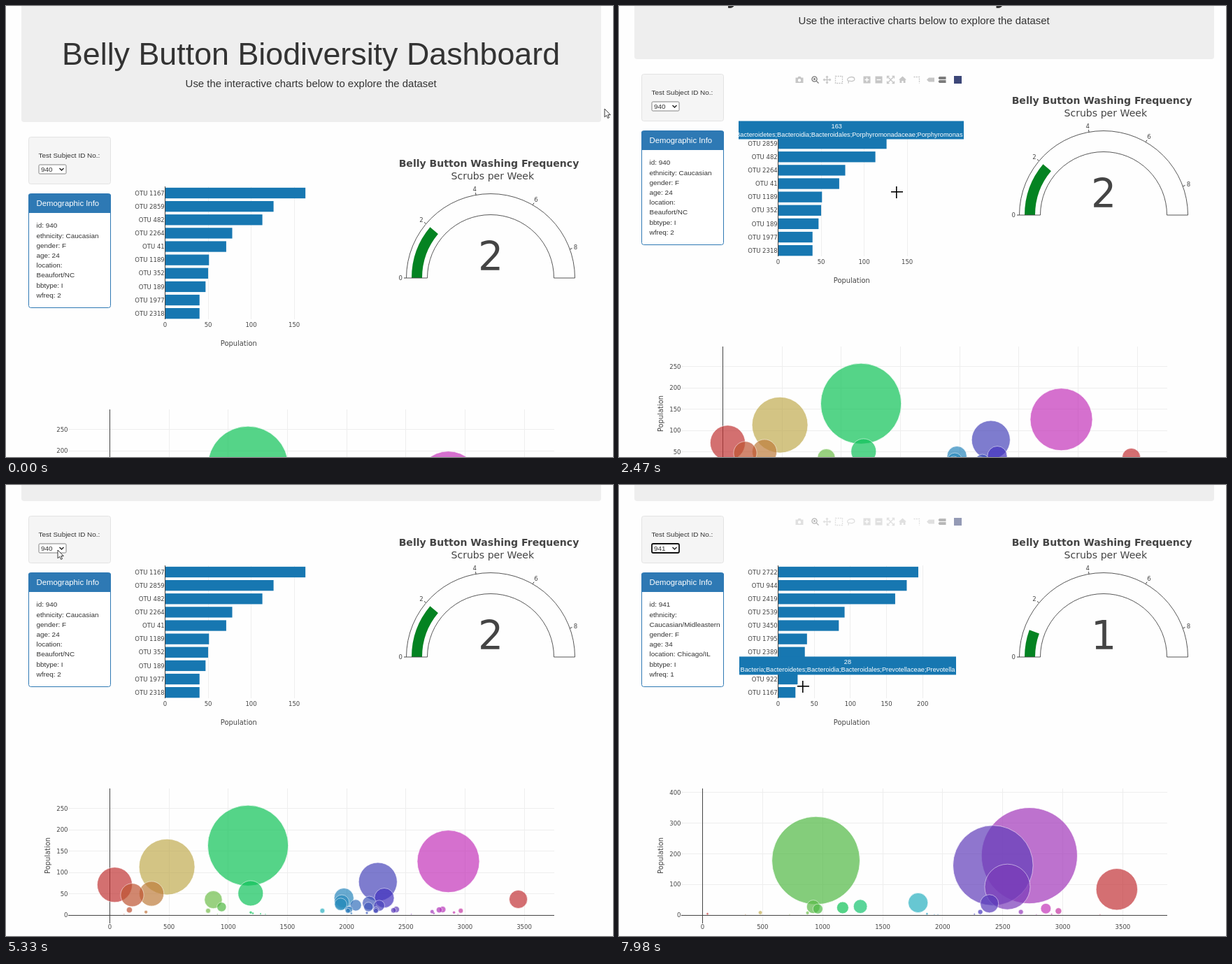
These frames come from a looping animation (868 by 645 pixels, 8 s). An HTML page:

```html
<!DOCTYPE html>
<html lang="en">
<head>
<meta charset="utf-8">
<title>Biodiversity Dashboard</title>
<style>
  html, body { margin: 0; width: 100%; height: 100%; overflow: hidden; background: #fefefe; }
  #stage { position: relative; width: 868px; height: 645px; overflow: hidden; background: #fefefe; isolation: isolate; }
  #stage > * { position: absolute; left: 0; top: 0; }
  text { font-family: "DejaVu Sans", Verdana, sans-serif; fill: #444; white-space: pre; }
  .ui { font-family: "Liberation Sans", Arial, sans-serif; fill: #333; }
  .white { fill: #fff; }
  .bold { font-weight: bold; }

  #page { animation: scroll 8s step-end infinite; }
  .first { animation: first 8s step-end infinite; }
  .second { animation: second 8s step-end infinite; }
  .tipA { animation: tipA 8s step-end infinite; }
  .tipB { animation: tipB 8s step-end infinite; }
  .list { animation: list 8s step-end infinite; }
  .pick { animation: pick 8s step-end infinite; }
  .barTools { animation: barTools 8s ease infinite; }
  .dialTools { animation: dialTools 8s ease infinite; }
  #arrow { animation: move 8s linear infinite, arrow 8s step-end infinite; }
  #cross { width: 17px; height: 17px; mix-blend-mode: difference;
    background: linear-gradient(#fff, #fff) 50% 50% / 1.6px 17px no-repeat,
                linear-gradient(#fff, #fff) 50% 50% / 17px 1.6px no-repeat;
    margin: -8.5px 0 0 -8.5px;
    animation: move 8s linear infinite, cross 8s step-end infinite; }

  @keyframes scroll {
    0% { transform: translateY(0); }
    23.1% { transform: translateY(-20px); }
    24.05% { transform: translateY(-55px); }
    25.1% { transform: translateY(-71px); }
    30.85% { transform: translateY(-90px); }
    31.8% { transform: translateY(-126px); }
    32.7% { transform: translateY(-141px); }
    33.7% { transform: translateY(-142px); }
    66.6%, 100% { transform: translateY(-143px); }
  }
  @keyframes first { 0% { opacity: 1; } 90.8%, 100% { opacity: 0; } }
  @keyframes second { 0% { opacity: 0; } 90.8%, 100% { opacity: 1; } }
  @keyframes tipA { 0% { opacity: 0; } 15% { opacity: 1; } 41.5%, 100% { opacity: 0; } }
  @keyframes tipB { 0% { opacity: 0; } 98.7%, 100% { opacity: 1; } }
  @keyframes list { 0% { opacity: 0; } 75.5% { opacity: 1; } 90.8%, 100% { opacity: 0; } }
  @keyframes pick { 0% { transform: none; } 81.5%, 100% { transform: translateY(12.63px); } }
  @keyframes barTools { 0%, 14.4% { opacity: 0; } 18.1%, 43.25% { opacity: 1; } 47%, 98.1% { opacity: 0; } 100% { opacity: .55; } }
  @keyframes dialTools { 0%, 9.75% { opacity: 0; } 13.5%, 14.5% { opacity: 1; } 18.2%, 100% { opacity: 0; } }
  @keyframes arrow { 0% { opacity: 1; } 14.5% { opacity: 0; } 43.1% { opacity: 1; } 99.2%, 100% { opacity: 0; } }
  @keyframes cross { 0% { opacity: 0; } 14.5% { opacity: 1; } 43.1% { opacity: 0; } 99.2%, 100% { opacity: 1; } }
  @keyframes move {
    0% { transform: translate(856px, 147px); }
    1% { transform: translate(856px, 149px); }
    4% { transform: translate(858px, 130px); }
    7.6%, 9.7% { transform: translate(861px, 103px); }
    11.6% { transform: translate(740px, 200px); }
    12.6% { transform: translate(640px, 270px); }
    13.6% { transform: translate(540px, 298px); }
    14.5% { transform: translate(440px, 282px); }
    15.4% { transform: translate(387px, 263px); }
    19.4%, 20.2% { transform: translate(386px, 262px); }
    21.2%, 40.5% { transform: translate(397px, 266px); }
    42.5% { transform: translate(310px, 242px); }
    43.4% { transform: translate(200px, 220px); }
    44.3% { transform: translate(129px, 199px); }
    46% { transform: translate(105px, 150px); }
    50%, 53% { transform: translate(74px, 97px); }
    56.8%, 72.3% { transform: translate(74px, 93px); }
    72.4%, 78.3% { transform: translate(75px, 92px); }
    80.2%, 80.4% { transform: translate(72px, 104px); }
    82.5% { transform: translate(62px, 108px); }
    85%, 87% { transform: translate(59px, 104px); }
    88%, 96.8% { transform: translate(67px, 107px); }
    97.8% { transform: translate(120px, 155px); }
    98.8% { transform: translate(200px, 230px); }
    99.6%, 100% { transform: translate(263px, 288px); }
  }
</style>
</head>
<body>
<div id="stage">
  <svg id="page" width="868" height="800"></svg>
  <svg id="arrow" width="14" height="18" viewBox="-1 -1 14 18" style="margin: -1px 0 0 -1px">
    <path d="M0 0V11.8L2.7 9.3 4.6 13.4 6.5 12.6 4.7 8.6H8.3Z" fill="#fff" stroke="#222" stroke-width=".9"/>
  </svg>
  <div id="cross"></div>
</div>
<script>
const BLUE = '#1777b1', PANEL = '#2e79b4', TICK = 8.52, BASE = 9.95;

const label = (x, y, s, size = TICK, cls = '', anchor = 'start', extra = '') =>
  `<text x="${x}" y="${y}" font-size="${size}" class="${cls}" text-anchor="${anchor}" ${extra}>${s}</text>`;
const rect = (x, y, w, h, fill, extra = '') =>
  `<rect x="${x}" y="${y}" width="${w}" height="${h}" fill="${fill}" ${extra}/>`;
const line = (x1, y1, x2, y2, stroke = '#eee') =>
  `<path d="M${x1} ${y1}L${x2} ${y2}" stroke="${stroke}" fill="none"/>`;
const group = (cls, ...parts) => `<g class="${cls}">${parts.flat().join('')}</g>`;
const range = (n, f) => Array.from({ length: n }, (_, i) => f(i));
const half = v => Math.floor(v) + .5;

// colour scale over the OTU ids
const stops = [
  [0, 193, 50, 55], [41, 192, 52, 52], [189, 190, 85, 50], [352, 190, 125, 60], [482, 192, 171, 81],
  [874, 110, 190, 75], [944, 81, 184, 68], [1167, 14, 194, 86], [1314, 20, 195, 110],
  [1795, 39, 175, 191], [1977, 41, 134, 188], [2264, 72, 69, 185], [2318, 67, 50, 190],
  [2419, 96, 61, 185], [2722, 162, 55, 186], [2859, 196, 52, 185], [3450, 194, 51, 55]
];
function color(id) {
  const i = Math.max(1, stops.findIndex(s => s[0] >= id));
  const [a, b] = [stops[i - 1], stops[i]];
  const k = (id - a[0]) / (b[0] - a[0]);
  return `rgb(${[1, 2, 3].map(c => Math.round(a[c] + (b[c] - a[c]) * k))})`;
}

const subjects = [{
  cls: 'first', id: 940, wash: 2,
  info: ['id: 940', 'ethnicity: Caucasian', 'gender: F', 'age: 24', 'location:', 'Beaufort/NC', 'bbtype: I', 'wfreq: 2'],
  bars: { unit: 1.231, step: 50, ticks: 4 },
  plot: { x0: 148.5, ux: .1693, uy: .609, step: 50, ticks: 6 },
  otu: [[1167, 163], [2859, 126], [482, 113], [2264, 78], [41, 71], [1189, 51], [352, 50], [189, 47], [1977, 40], [2318, 40],
    [3450, 37], [874, 36], [1959, 30], [2191, 28], [1950, 25], [2077, 23], [2275, 22], [944, 19], [2184, 19],
    [2011, 13], [2024, 13], [2419, 13], [2811, 13], [165, 12], [2247, 12], [2782, 12], [2396, 11], [2011, 10], [2247, 10],
    [1795, 10], [830, 10], [2964, 10], [2722, 8], [305, 7], [2907, 6], [1190, 6], [2171, 5], [1208, 4], [2737, 4],
    [2040, 4], [1273, 3], [1314, 2], [2940, 2], [120, 2], [908, 2], [2546, 2]]
}, {
  cls: 'second', id: 941, wash: 1,
  info: ['id: 941', 'ethnicity:', 'Caucasian/Midleastern', 'gender: F', 'age: 34', 'location: Chicago/IL', 'bbtype: I', 'wfreq: 1'],
  bars: { unit: 1.0335, step: 50, ticks: 5 },
  plot: { x0: 119.5, ux: .1717, uy: .4377, step: 100, ticks: 5 },
  otu: [[2722, 194], [944, 178], [2419, 162], [2539, 92], [3450, 84], [1795, 40], [2389, 37], [1314, 28], [922, 27], [1167, 24],
    [2859, 21], [960, 20], [2964, 13], [2651, 10], [2313, 10], [481, 8], [874, 7], [41, 4], [1869, 4], [2264, 3],
    [2907, 3], [1930, 2], [1960, 2], [357, 2], [725, 2], [2780, 2], [3310, 2]]
}];

const rowY = i => 267.5 + 19.13 * i;

function barChart({ bars: { unit, step, ticks }, otu }) {
  const x = v => 227.5 + v * unit;
  return [
    range(ticks, i => line(half(x(i * step)), 258, half(x(i * step)), 448)),
    otu.slice(0, 10).map(([id, v], i) =>
      rect(227.5, rowY(i) - 7.65, v * unit, 15.3, BLUE) + label(226.8, rowY(i) + 3.2, 'OTU ' + id, TICK, '', 'end')),
    line(227.5, 258, 227.5, 448, '#444'),
    range(ticks, i => label(x(i * step), 458.6, i * step, TICK, '', 'middle')),
    label(332.8, 486, 'Population', 9.9, '', 'middle')
  ].flat();
}

function bubbleChart({ plot: { x0, ux, uy, step, ticks }, otu }) {
  const x = v => x0 + v * ux, y = v => 758 - v * uy;
  return [
    range(7, i => line(half(x(500 * i + 500)), 577, half(x(500 * i + 500)), 770)),
    range(ticks, i => line(89, half(y(i * step)), 784, half(y(i * step)))),
    line(89, 758.5, 784, 758.5, '#444'), line(x0, 577, x0, 770, '#444'),
    otu.map(([id, v]) => `<circle cx="${x(id)}" cy="${y(v)}" r="${v * .3536}" fill="${color(id)}" stroke="#fff" stroke-width="${v > 5 ? .71 : .2}" opacity=".7"/>`),
    range(8, i => label(x(500 * i), 778.3, 500 * i, TICK, '', 'middle')),
    range(ticks, i => label(88.5, y(i * step) + 3.2, i * step, TICK, '', 'end')),
    label(0, 0, 'Population', 9.9, '', 'middle', 'transform="translate(62.5 673) rotate(-90)"')
  ].flat();
}

const polar = (v, r) => {
  const a = Math.PI * (1 - v / 9);
  return [693 + r * Math.cos(a), 389 - r * Math.sin(a)];
};
function gauge({ wash }) {
  const arc = r => `A${r} ${r} 0 0 `;
  return [
    `<path d="M${polar(0, 105.5)}${arc(105.5)}1 ${polar(wash, 105.5)}" fill="none" stroke="#048322" stroke-width="15"/>`,
    `<path d="M572.5 389${arc(120.5)}1 813.5 389H783.5${arc(90.5)}0 602.5 389Z" fill="none" stroke="#444" stroke-width=".9"/>`,
    [0, 2, 4, 6, 8].map(v => {
      const [x, y] = polar(v, 128.8);
      return line(...polar(v, 120.5), ...polar(v, 124), '#444') + label(x - (v > 4 ? -.5 : v ? .3 : 0), y + 3, v, TICK, '', 'middle');
    }),
    label(693, 378, wash, 56.9, '', 'middle'),
    label(690.5, 230, 'Belly Button Washing Frequency', 14.07, 'bold', 'middle'),
    label(695.8, 248, 'Scrubs per Week', 14.1, '', 'middle')
  ].flat();
}

function sidebar({ id, info, cls }) {
  const ring = cls === 'second';
  return [
    rect(47, 227, 39, 13, '#fff', ring ? 'rx="2" stroke="#111" stroke-width="1.8"' : 'rx="1.5" stroke="#767676" stroke-width=".9"'),
    label(50, 237, id, BASE, 'ui'),
    '<path d="M76.5 232l3 3 3-3" fill="none" stroke="#222" stroke-width="1.4"/>',
    info.map((s, i) => label(43.5, 317.4 + 14.2 * i, s, BASE, 'ui'))
  ].flat();
}

// toolbar icons: x, path, style ('f' fill, 's' stroke, 'd' dashed), strength
const CAMERA = 'M-5.5-3h3l1-1.7h3l1 1.7h3v7.5h-11zM2.2.8a2.2 2.2 0 1 1-4.4 0a2.2 2.2 0 1 1 4.4 0z';
const BOX = 'M-5-5h10v10h-10z';
const icons = [
  [258, CAMERA, 'f'],
  [280.5, 'M2.6-1a3.6 3.6 0 1 1-7.2 0a3.6 3.6 0 1 1 7.2 0zM1.6 1.6L5 5M-2.6-1h3.2M-1-2.6v3.2', 's', .7],
  [297.5, 'M-5 0H5M0-5V5M-3.5-1.5L-5 0l1.5 1.5M3.5-1.5L5 0 3.5 1.5M-1.5-3.5L0-5l1.5 1.5M-1.5 3.5L0 5l1.5-1.5', 's'],
  [314.5, BOX, 'd'],
  [331.5, 'M-3 2C-7 0-4-4 1-4S7 1 2 2C0 2.500-2 1-3 2s1 2-1 3', 's'],
  [354.5, BOX + 'M-.8-3h1.6v2.2h2.2v1.6H.8V3H-.8V.8H-3V-.8h2.2z', 'f'],
  [371.5, BOX + 'M-3-.8h6v1.6h-6z', 'f'],
  [388.5, 'M-4-4L4 4M4-4L-4 4M-5-2v-3h3M5-2v-3h-3M-5 2v3h3M5 2v3h-3', 's'],
  [405.5, 'M-5.500 0L0-5 5.500 0H4v4.500H1.200V1.500h-2.400v3H-4V0z', 'f'],
  [426.5, 'M-5-4H3V5', 'd'],
  [445.5, 'M-5.500 0l3-3h8v6h-8z', 'f'],
  [462, 'M-5.500-2.600l1.500-2H5.500v4H-4zM-5.500 2.600l1.500-2H5.500v4H-4z', 'f', .7]
];
function icon([x, d, kind, strength = .3]) {
  const paint = kind === 'f' ? 'fill="#444" fill-rule="evenodd"'
    : `fill="none" stroke="#444" stroke-width="1.3" ${kind === 'd' ? 'stroke-dasharray="2 1.3"' : ''}`;
  return `<path transform="translate(${x} 195.500)" d="${d}" ${paint} opacity="${strength}"/>`;
}
const badge = x => rect(x, 190, 11, 11, '#3c4778');

const tip = (cls, row, x, w, mid, count, name) => group(cls,
  rect(x, rowY(row) - 13, w, 26, BLUE),
  label(mid, rowY(row) - 2.3, count, 9.23, 'ui white', 'middle'),
  `<g clip-path="url(#edge)">${label(mid, rowY(row) + 9, name, 9.23, 'ui white', 'middle')}</g>`);

const ids = [0, 1, 3, 4, 5, 6, 7, 8, 9, 10, 12, 13, 14, 15, 16, 18, 19, 20, 21, 22];
const dropdown = () => group('list',
  rect(47, 241, 39, 253, '#fff', 'stroke="#777" stroke-width=".9" filter="url(#shade)"'),
  `<g class="pick">${rect(47.5, 241.5, 27, 12.6, '#1487ec')}</g>`,
  ids.map((n, i) => label(50, 250.8 + 12.63 * i, 940 + n, BASE, 'ui')),
  `<g class="first">${label(50, 250.8, 940, BASE, 'ui white pickA')}</g>`,
  rect(74.5, 241.5, 11, 252, '#f1f1f1'), rect(75, 254, 10, 29, '#c1c1c1'),
  '<path d="M77.500 249.500l2.500-3 2.500 3z" fill="#a3a3a3"/><path d="M77.500 486l2.500 3 2.500-3z" fill="#444"/>');

document.getElementById('page').innerHTML = [
  `<defs><clipPath id="edge">${rect(170.5, 180, 330, 300, '#000')}</clipPath>
   <filter id="shade" x="-30%" y="-10%" width="160%" height="120%"><feDropShadow dx="1" dy="1" stdDeviation="1.8" flood-opacity=".4"/></filter></defs>`,
  rect(22, -10, 829, 176, '#eee', 'rx="4"'),
  label(436, 84, 'Belly Button Biodiversity Dashboard', 44.8, 'ui', 'middle'),
  label(436.2, 115.5, 'Use the interactive charts below to explore the dataset', 14.93, 'ui', 'middle'),
  rect(32.5, 187.5, 117, 67, '#f5f5f5', 'rx="3" stroke="#e3e3e3"'),
  label(46.5, 216.8, 'Test Subject ID No.:', BASE, 'ui'),
  rect(32.5, 268.5, 117, 163, '#fff', `rx="3" stroke="${PANEL}"`),
  `<path d="M32 296V271.500a3 3 0 0 1 3-3H147a3 3 0 0 1 3 3V296z" fill="${PANEL}"/>`,
  label(43.5, 286.4, 'Demographic Info', 11.37, 'ui white'),
  subjects.map(s => group(s.cls, sidebar(s), barChart(s), gauge(s), bubbleChart(s))),
  group('barTools', icons.map(icon), badge(479)),
  group('dialTools', icon([837.5, CAMERA, 'f']), badge(854.5)),
  tip('tipA', 0, 171, 322, 311.2, 163, 'Bacteria;Bacteroidetes;Bacteroidia;Bacteroidales;Porphyromonadaceae;Porphyromonas'),
  tip('tipB', 7, 172, 310, 327, 28, 'Bacteria;Bacteroidetes;Bacteroidia;Bacteroidales;Prevotellaceae;Prevotella'),
  dropdown()
].flat().join('');

// the white list entry follows the highlight
const picked = document.querySelector('.pickA');
picked.animate([{ opacity: 1 }, { opacity: 0, offset: .815 }, { opacity: 0 }],
  { duration: 8000, iterations: Infinity, easing: 'linear' }).effect.setKeyframes([
    { opacity: 1, offset: 0, easing: 'step-end' }, { opacity: 0, offset: .815 }, { opacity: 0, offset: 1 }]);
</script>
</body>
</html>
```
